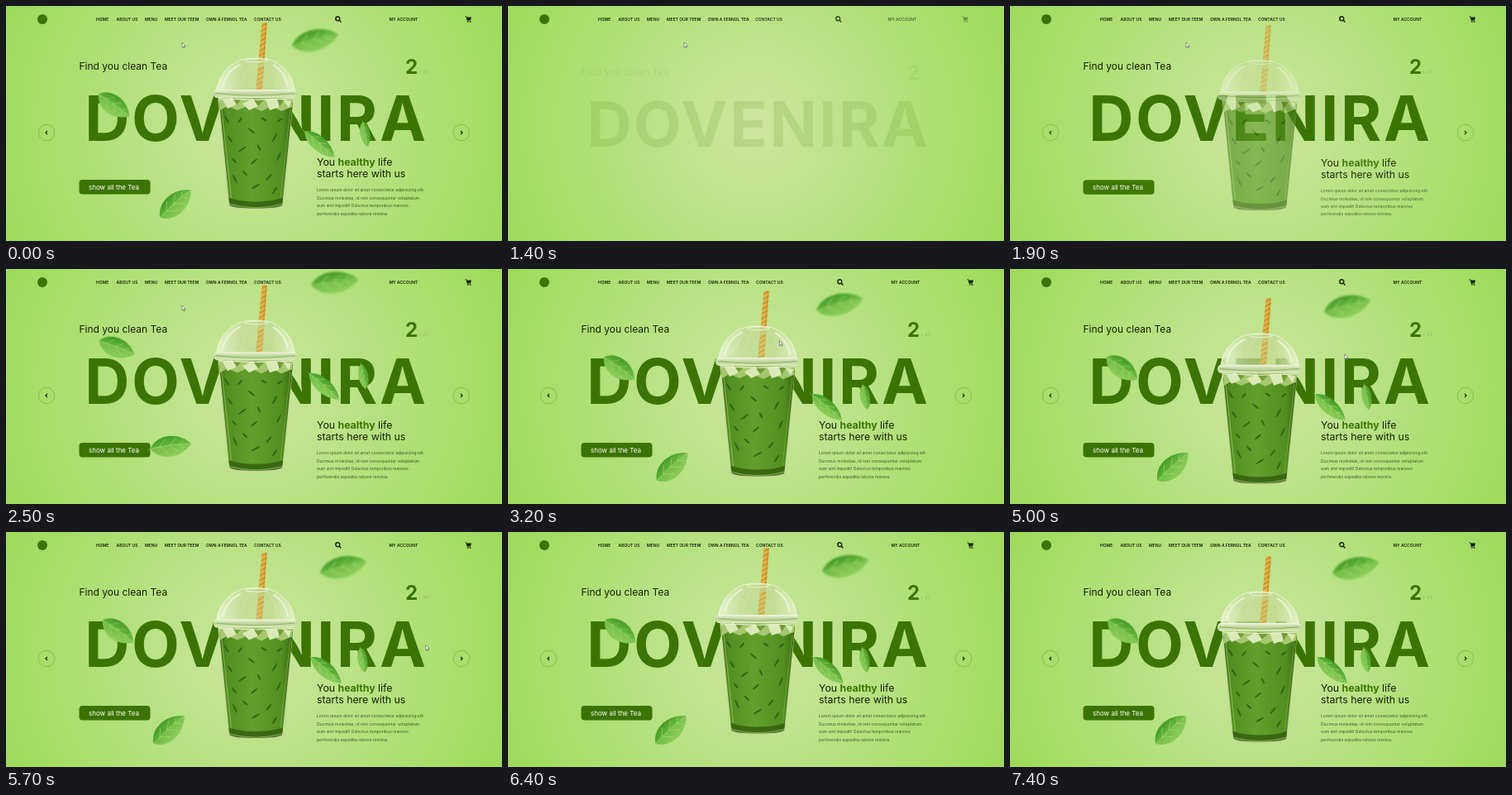
An HTML page that plays this animation: 600x284 px, repeating every 7500 ms.

```html
<!DOCTYPE html>
<html lang="en">
<head>
<meta charset="utf-8">
<title>Tea landing page</title>
<style>
  html, body { margin: 0; width: 100%; height: 100%; overflow: hidden; }
  body { background: radial-gradient(circle at 300px 145px, #cce7a0 0, #b4e17d 165px, #9fdb5b 325px); }
  svg { display: block; width: 600px; height: 284px; font-family: Inter, Roboto, sans-serif; fill: #142207; }
  .nav { font-size: 5px; font-weight: 600; }
  .lead { font-size: 12px; }
  .claim { font-size: 12.3px; }
  .copy { font-size: 5px; fill: #3e5b22; }
  .brand { font-size: 75px; font-weight: 700; letter-spacing: 2.7px; text-anchor: middle; }
  .green { fill: #3b7400; }
  .line { fill: none; stroke: #142207; }
</style>
</head>
<body>
<svg viewBox="0 0 600 284">
  <defs>
    <linearGradient id="tea">
      <stop offset="0" stop-color="#37680f"/>
      <stop offset=".1" stop-color="#528f20"/>
      <stop offset=".45" stop-color="#639f2d"/>
      <stop offset=".85" stop-color="#528f20"/>
      <stop offset="1" stop-color="#37680f"/>
    </linearGradient>
    <linearGradient id="dome">
      <stop offset="0" stop-color="#eaf5d3" stop-opacity=".9"/>
      <stop offset=".3" stop-color="#c5dc9b" stop-opacity=".75"/>
      <stop offset=".7" stop-color="#c0da91" stop-opacity=".7"/>
      <stop offset="1" stop-color="#e6f3ca" stop-opacity=".9"/>
    </linearGradient>
    <linearGradient id="rim" x2="0" y2="1">
      <stop offset="0" stop-color="#f1f7df"/>
      <stop offset=".5" stop-color="#bdd39a"/>
      <stop offset="1" stop-color="#dcebbd"/>
    </linearGradient>
    <linearGradient id="blade" x2=".3" y2="1">
      <stop offset="0" stop-color="#3c9322"/>
      <stop offset=".5" stop-color="#5fb338"/>
      <stop offset="1" stop-color="#83c955"/>
    </linearGradient>
    <pattern id="stripes" width="7" height="5" patternUnits="userSpaceOnUse" patternTransform="rotate(-28)">
      <rect width="7" height="5" fill="#e6b246"/>
      <rect width="7" height="1.6" fill="#c98d2b"/>
    </pattern>
    <filter id="soft" x="-20%" y="-20%" width="140%" height="140%"><feGaussianBlur stdDeviation="1.3"/></filter>
    <filter id="faint"><feGaussianBlur stdDeviation=".45"/></filter>
    <g id="leaf">
      <path d="M-50 0C-32-46 22-48 50 0C22 46-30 48-50 0Z" fill="url(#blade)"/>
      <path d="M-50 0Q0-8 50 0C22 46-30 48-50 0Z" fill="#95d25f" opacity=".35"/>
      <path d="M-56 2Q0-8 50 0M-28-2L-12-25M-28-2L-8 22M-4-4L14-24M-4-4L16 20M20-3L31-14M20-3L32 12"
            fill="none" stroke="#b5de86" stroke-width="1.8" opacity=".7"/>
    </g>
  </defs>

  <!-- data-in: start ms, then the x and y offset it enters from -->
  <g class="nav">
    <circle data-in="535 -10 0" cx="44" cy="16" r="6" class="green"/>
    <text data-in="620 -10 0" x="109" y="17.9">HOME</text>
    <text data-in="705 -10 0" x="133.5" y="17.9">ABOUT US</text>
    <text data-in="790 -10 0" x="168" y="17.9">MENU</text>
    <text data-in="875 -10 0" x="192" y="17.9">MEET OUR TEEM</text>
    <text data-in="960 -10 0" x="242" y="17.9">OWN A FERNOL TEA</text>
    <text data-in="1045 -10 0" x="300" y="17.9">CONTACT US</text>
    <path data-in="1130 -10 0" class="line" stroke-width="1.4" d="M403.2 17.2L405.4 19.4M403.8 15.2a2.5 2.5 0 1 0-5 0a2.5 2.5 0 1 0 5 0"/>
    <text data-in="1215 -10 0" x="463.5" y="17.9">MY ACCOUNT</text>
    <g data-in="1300 -10 0">
      <path d="M557 13.6H563L562 17H558Z"/>
      <path class="line" stroke-width=".9" d="M555.5 12.9H557L558.2 18H562.2"/>
      <circle cx="558.8" cy="19.2" r=".8"/><circle cx="561.7" cy="19.2" r=".8"/>
    </g>
  </g>

  <text data-in="1385 0 8" class="lead" x="88.5" y="76.5">Find you clean Tea</text>
  <g data-in="1385 0 8">
    <text class="green" x="483" y="81.5" font-size="24" font-weight="700">2</text>
    <text x="499.5" y="81" font-size="5" fill="#8cae66" letter-spacing=".9">/ 21</text>
  </g>
  <text data-in="1370 0 8" class="brand green" x="303" y="162.5">DOVENIRA</text>
  <g data-in="1500 0 8">
    <rect class="green" x="88.5" y="210" width="86" height="17.5" rx="4"/>
    <text x="100" y="221.7" font-size="8" fill="#fff">show all the Tea</text>
  </g>
  <g data-in="1550 0 8">
    <text class="claim" x="376" y="193">You <tspan class="green" font-weight="700">healthy</tspan> life</text>
    <text class="claim" x="376" y="207.3">starts here with us</text>
    <text class="copy">
      <tspan x="376" y="224.3">Lorem ipsum dolor sit amet consectetur adipisicing elit.</tspan>
      <tspan x="376" y="233.8">Ducimus molestias, id rem consequuntur voluptatum</tspan>
      <tspan x="376" y="243.2">eum sint impedit! Delectus temporibus maiores</tspan>
      <tspan x="376" y="252.6">perferendis expedita ratione minima.</tspan>
    </text>
  </g>
  <g data-in="1600 0 0" class="line">
    <g stroke="#6f9f42" stroke-width=".6"><circle cx="49" cy="153" r="9.8"/><circle cx="551" cy="153" r="9.8"/></g>
    <path stroke-width="1.2" d="M50 151L48 153L50 155M550 151L552 153L550 155"/>
  </g>

  <g id="cup">
    <path d="M256 106H348L336 239Q334 244 325 244.500H279Q270 244.500 268.500 239Z" fill="#c3d89a"/>
    <path d="M258 115Q302 109 347 115L334.500 237Q302 247 270 237Z" fill="url(#tea)"/>
    <path d="M269.500 231Q302 240 335 231L334 240Q328 243.500 302 243.500T270.500 240Z" fill="#315d0d" opacity=".8"/>
    <path d="M270 238.500Q302 247 334 238.500" fill="none" stroke="#8cb653" stroke-width=".8"/>
    <g filter="url(#faint)">
      <path d="M258 110H347L346 121L333 126L321 120L309 126L294 119L280 125L268 120L259 125Z" fill="#a5c86f"/>
      <path d="M262 112L274 110L279 118L268 123ZM286 117L299 111L305 120L294 125ZM314 112L328 111L331 121L319 125ZM335 112L345 114L342 122Z" fill="#dbe9b8"/>
      <path d="M274 110L284 113L279 118ZM299 111L313 112L305 120ZM328 111L336 113L331 121Z" fill="#719f36"/>
      <g id="streaks" fill="#315d0c" opacity=".85"></g>
    </g>
    <path d="M261 124L272.500 231" stroke="#a1c66b" stroke-width="1.3" opacity=".6"/>
    <path d="M344 124L332 231" stroke="#86b34b" stroke-width="1" opacity=".6"/>
    <path d="M309.500 20Q313 18 316 20L309.500 109H301.500Z" fill="url(#stripes)"/>
    <path d="M314.500 20L308.500 109" stroke="#a9741c" stroke-width="1" opacity=".45"/>
    <path d="M255 102C256 80 276 64 291 63H315C329 65 348 80 349 102Z" fill="url(#dome)"/>
    <g fill="none" stroke="#f3f9e5">
      <path d="M255 102C256 80 276 64 291 63H315C329 65 348 80 349 102" stroke-width=".8"/>
      <path d="M262 97Q266 78 284 69M341 97Q338 79 323 70" stroke-width="2.4" opacity=".65"/>
      <path d="M272 98Q276 80 291 67M283 99Q287 82 296 67M329 98Q327 80 315 67" stroke-width=".7" stroke-dasharray="1 1.200" opacity=".6"/>
      <ellipse cx="303" cy="64.500" rx="14" ry="2.300" stroke-width=".8"/>
    </g>
    <path d="M304.800 72H312.300L309.800 104H302Z" fill="url(#stripes)" opacity=".55"/>
    <rect x="251" y="100" width="101" height="10" rx="4.500" fill="url(#rim)"/>
    <path d="M254 104.500Q302 110 349 104.500" fill="none" stroke="#8bae5c" stroke-width=".9"/>
    <path d="M258 111Q302 114 347 111" fill="none" stroke="#edf6d8" stroke-width="1"/>
  </g>

  <g id="leaves"></g>
  <path id="cursor" d="M0 0V6L1.400 4.800L2.300 6.800L3.200 6.400L2.300 4.500H4.100Z" fill="#fff" stroke="#333" stroke-width=".5"/>
</svg>

<script>
const LOOP = 7500, RELOAD = 200;
const $ = id => document.getElementById(id);
const clamp = v => Math.min(1, Math.max(0, v));
const easeOut = p => 1 - (1 - clamp(p)) ** 2;
const swing = p => (1 - Math.cos(2 * Math.PI * p)) / 2;

function add(parent, tag, attrs) {
  const node = document.createElementNS("http://www.w3.org/2000/svg", tag);
  for (const key in attrs) node.setAttribute(key, attrs[key]);
  return parent.appendChild(node);
}

function place(node, x, y, alpha, rest = "") {
  node.setAttribute("transform", `translate(${x.toFixed(2)} ${y.toFixed(2)})${rest}`);
  node.setAttribute("opacity", alpha.toFixed(3));
}

// keys: [time, value...], linear in between
function track(keys, t) {
  const i = keys.findIndex(k => k[0] > t);
  if (i < 0) return keys[keys.length - 1].slice(1);
  const a = keys[i - 1], b = keys[i], p = (t - a[0]) / (b[0] - a[0]);
  return a.slice(1).map((v, n) => v + (b[n + 1] - v) * p);
}

// x, y, angle of the streaks in the tea
[[283, 137, -50], [297, 150, 40], [325, 158, -60], [331, 137, -35], [271, 160, 55],
 [286, 172, -35], [306, 170, 65], [300, 187, -40], [330, 181, -65], [289, 201, 45],
 [318, 206, -50], [277, 208, 65], [276, 186, 50], [325, 222, -60], [302, 217, -30],
 [312, 136, 30], [267, 136, 60]].forEach(([x, y, a], i) =>
  add($("streaks"), "ellipse", { rx: 4 + i % 3, ry: 1.1, transform: `translate(${x} ${y}) rotate(${a})` }));

const leaves = [
  { x: 408, y: 41, turn: -14, w: .58, h: .36, shift: 34, spin: -.3, sway: 5, blur: "soft" },
  { x: 135.5, y: 120, turn: 36, w: .46, h: .33, shift: 5, spin: .6, blur: "faint" },
  { x: 387.5, y: 167, turn: 41, w: .48, h: .25, shift: 8, spin: 0 },
  { x: 431.5, y: 155, turn: 80, w: .31, h: .17, shift: -3, spin: 0 },
  { x: 197, y: 239, turn: -42, w: .5, h: .35, shift: -8, spin: -1.4 }
].map(leaf => {
  const attrs = { href: "#leaf" };
  if (leaf.blur) attrs.filter = `url(#${leaf.blur})`;
  const node = add($("leaves"), "g", {});
  const scaled = add(node, "g", { transform: `scale(${leaf.w} ${leaf.h})` });
  if (leaf.blur) {
    delete attrs.filter;
    node.setAttribute("filter", `url(#${leaf.blur})`);
  }
  add(scaled, "use", attrs);
  return { ...leaf, node };
});

const entries = [...document.querySelectorAll("[data-in]")].map(node => {
  const [start, dx, dy] = node.dataset.in.split(" ").map(Number);
  return { node, start, dx, dy };
});

const pointer = [[0, 213, 44], [3000, 213, 44], [3500, 500, 150], [4000, 392, 153],
  [4500, 425, 140], [5000, 405, 103], [5400, 405, 103], [6000, 610, 170]];
const parallax = [[0, -1], [RELOAD, -1], [RELOAD + 1, -.3], [3000, -.3], [3600, 0], [6400, 0], [7400, .3]];

function draw(t) {
  const before = t < RELOAD;
  const enter = (start, length) => before ? 1 : easeOut((t - start) / length);

  for (const { node, start, dx, dy } of entries) {
    const p = enter(start, 500);
    place(node, dx * (1 - p), dy * (1 - p), p);
  }

  const bob = swing(before ? (t + 280) / 4000 : (t - 2400) / 4000);
  const lift = before || t > 2400 ? 20 * bob : 0;
  const shown = enter(1700, 500);
  place($("cup"), 0, lift + 10 * (1 - shown), shown);

  const [drift] = track(parallax, t);
  const drop = before ? 0 : -50 * (1 - clamp((t - 2100) / 800));
  const alpha = enter(2100, 350);
  for (const leaf of leaves) {
    place(leaf.node, leaf.x + leaf.shift * drift, leaf.y + drop + (leaf.sway || 0) * bob, alpha,
      ` rotate(${(leaf.turn + leaf.spin * drop).toFixed(2)})`);
  }

  place($("cursor"), ...track(pointer, t), 1);
}

const begin = performance.now();
function tick() {
  draw((performance.now() - begin) % LOOP);
  requestAnimationFrame(tick);
}
tick();
</script>
</body>
</html>
```
